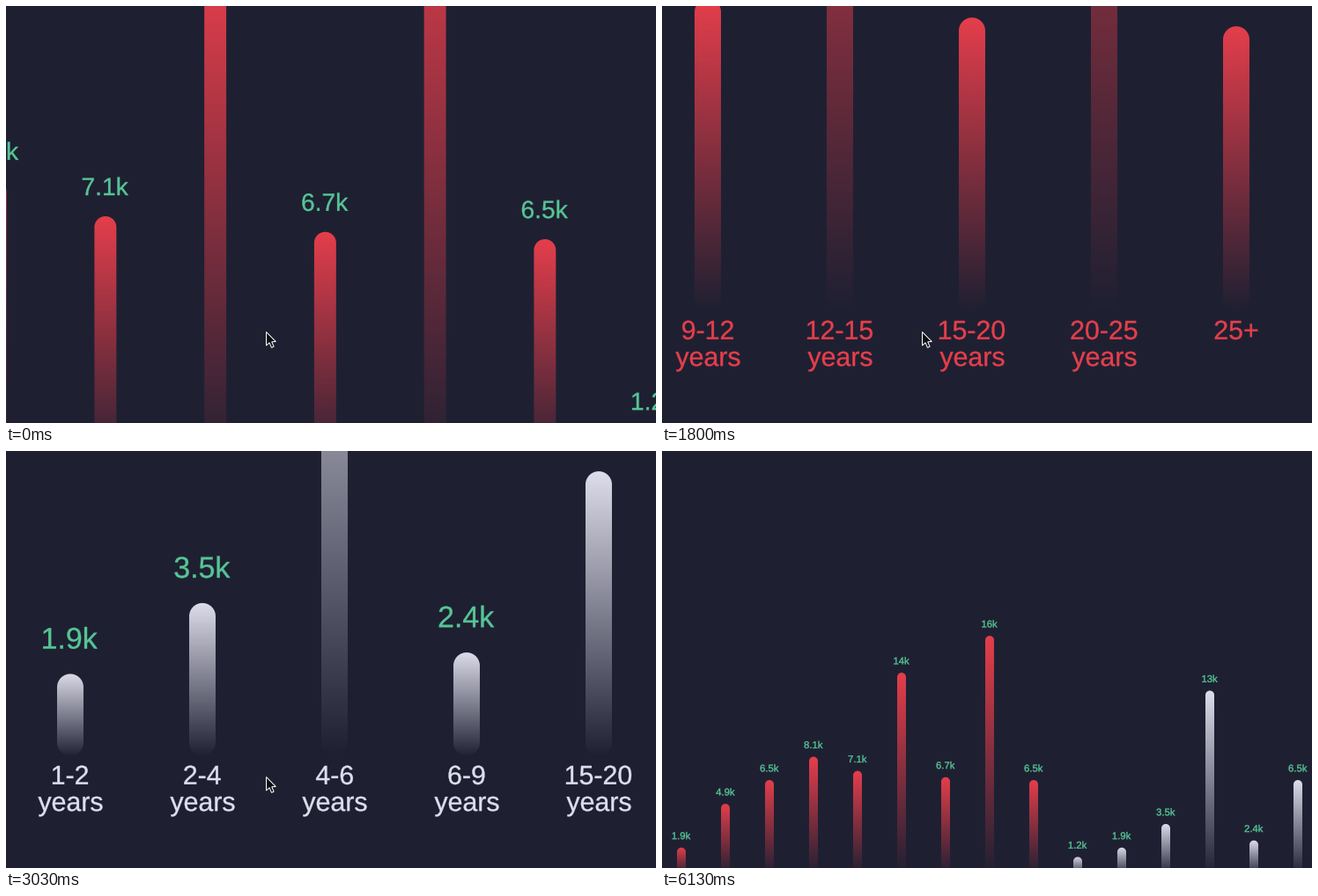
These frames come from a looping animation (738 px wide and 474 px high, 6.16 s). A matplotlib script:

```python
import numpy as np
import matplotlib.pyplot as plt
from matplotlib.animation import FuncAnimation
from matplotlib.colors import to_rgb
from matplotlib.patches import PathPatch, Polygon
from matplotlib.path import Path
from matplotlib.textpath import TextPath
from matplotlib.transforms import Affine2D

W, H, DPI = 738, 474, 100
LOOP, STEP = 6160, 28
BG, RED, WHITE, GREEN = "#1e2032", "#e63e4b", "#dfdeec", "#56c595"
BASE, FIRST, GAP, BAR = 481.8, 22, 50, 10
UNIT = 16.58  # height of one thousand
FOCUS = 295, 371
MAX_ZOOM = 3

RED_DATA = {"1-2": 1.87, "2-4": 4.87, "4-6": 6.5, "6-9": 8.1, "9-12": 7.13,
            "12-15": 13.86, "15-20": 6.7, "20-25": 16.39, "25+": 6.5}
WHITE_DATA = {"0-1": 1.23, "1-2": 1.87, "2-4": 3.49, "4-6": 12.63, "6-9": 2.36, "15-20": 6.5}

fig = plt.figure(figsize=(W / DPI, H / DPI), dpi=DPI, facecolor=BG)
ax = fig.add_axes([0, 0, 1, 1])
ax.axis("off")


def write(text, x, y, size, color):
    path = TextPath((0, 0), text, size=size, prop={"family": "Liberation Sans"})
    box = path.get_extents()
    place = Affine2D().translate(-(box.x0 + box.x1) / 2, 0).scale(1, -1).translate(x, y)
    ax.add_patch(PathPatch(place.transform_path(path), fc=color, ec=color, lw=0.25, snap=False))


def draw_bar(x, top, color):
    r = BAR / 2
    fade = np.linspace(1, 0, 256)[:, None, None]
    shade = fade * np.array(to_rgb(color)) + (1 - fade) * np.array(to_rgb(BG))
    im = ax.imshow(np.repeat(shade, 2, axis=1), aspect="auto", interpolation="bilinear",
                   extent=(x - r - 1, x + r + 1, BASE + 0.5, top - 0.5))
    a = np.linspace(0, np.pi, 40)
    cap = np.column_stack([x + r * np.cos(a), top + r - r * np.sin(a)])
    foot = np.column_stack([x - r * np.cos(a), BASE - r + r * np.sin(a)])
    im.set_clip_path(Path(np.vstack([cap, foot, cap[:1]])), ax.transData)


def draw_group(data, x, color):
    for age, value in data.items():
        top = BASE - value * UNIT
        draw_bar(x, top, color)
        write(f"{value:.{int(value < 10)}f}k", x, top - 9.6, 11.3, GREEN)
        write(age, x, BASE + 10.8, 10.1, color)
        if not age.endswith("+"):
            write("years", x, BASE + 20.9, 10.1, color)
        x += GAP


draw_group(RED_DATA, FIRST, RED)
draw_group(WHITE_DATA, FIRST + GAP * len(RED_DATA), WHITE)

mouse = Affine2D()
arrow = [(0, 0), (0, 15.5), (3.6, 12.2), (6, 17.8), (8.6, 16.7), (6.2, 11.2), (10.8, 11)]
ax.add_patch(Polygon(arrow, fc="#0c0c12", ec="white", lw=72 / DPI, joinstyle="miter",
                     transform=mouse, zorder=5, snap=False))


def ease(t, start, end):
    u = np.clip((t - start) / (end - start), 0, 1)
    return u * u * (3 - 2 * u)


def zoom(t):
    """Settle at full zoom, then pinch back out to 1."""
    left = max(0, 1 - t / 450) ** 2
    return MAX_ZOOM * (2.495 / MAX_ZOOM) ** left * MAX_ZOOM ** -ease(t, 3820, 4140)


def look(t):
    """World point under FOCUS: each term is one swipe."""
    x = (295 + 8 * ease(t, 1270, 1780) + 293 * ease(t, 1790, 2874)
         + 5 * ease(t, 3020, 3200) - 306 * ease(t, 3900, 4433))
    y = (416.5 + 73.5 * ease(t, 800, 1560)
         + 59 * ease(t, 4050, 4440) - 178 * ease(t, 4440, 5420))
    return x, y


def pointer(t):
    drift = 75 * ease(t, 3960, 4400)
    return 295.5 - drift, 370.5 + drift + 54 * ease(t, 5050, 5250)


def update(k):
    t = k * STEP
    s = zoom(t)
    x, y = look(t)
    left, top = x - FOCUS[0] / s, y - FOCUS[1] / s
    ax.set_xlim(left, left + W / s)
    ax.set_ylim(top + H / s, top)
    px, py = pointer(t)
    mouse.clear().scale(1, -1).translate(px, H - py)
    return []


anim = FuncAnimation(fig, update, frames=LOOP // STEP, interval=STEP,
                     repeat=True, repeat_delay=0, cache_frame_data=False)
plt.show()
```
